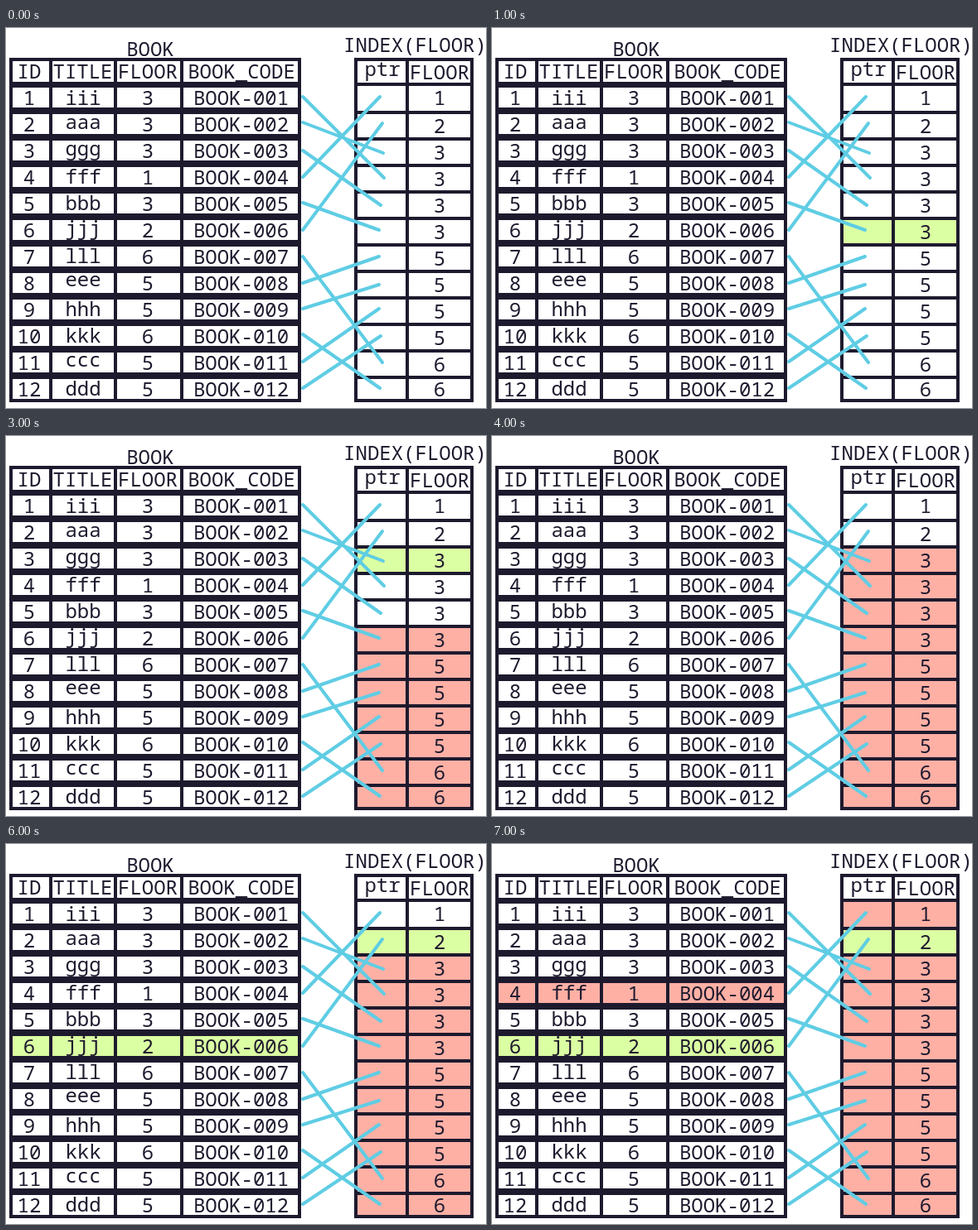
An HTML page with a canvas that plays this animation: 579x459 px, repeating every 8000 ms.

```html
<!DOCTYPE html>
<html lang="en">
<head>
<meta charset="utf-8">
<style>
html, body { margin: 0; width: 100%; height: 100%; overflow: hidden; background: #fff; }
canvas { display: block; }
</style>
</head>
<body>
<canvas id="stage" width="579" height="459"></canvas>
<script>
const ctx = document.getElementById("stage").getContext("2d");
const INK = "#1e1a2e", GREEN = "#dbffa3", RED = "#ffb0a5", LINK = "#5fcde4";
const LOOP = 8000, PITCH = 32, FIRST_ROW = 72;

// title, floor, offset of the title's baseline within the row
const books = [
  ["iii", 3, 21], ["aaa", 3, 18], ["ggg", 3, 18], ["fff", 1, 20],
  ["bbb", 3, 20], ["jjj", 2, 18], ["lll", 6, 20], ["eee", 5, 16],
  ["hhh", 5, 20], ["kkk", 6, 20], ["ccc", 5, 17], ["ddd", 5, 20]
];
const floors = books.map(book => book[1]).sort();

// links from each book row to its index entry: [y1, x2, y2]
const links = [
  [83, 456, 181], [114, 455, 151], [148, 452, 214], [180, 451, 83],
  [211, 450, 244], [244, 454, 115], [276, 454, 404], [308, 450, 276],
  [339, 450, 310], [370, 451, 435], [403, 450, 339], [435, 452, 372]
];

// binary search: [start, table, first row, last row, colour]
const steps = [
  [1000, "index", 6, 6, GREEN],
  [2000, "index", 6, 12, RED],
  [3000, "index", 3, 3, GREEN],
  [4000, "index", 3, 5, RED],
  [5000, "index", 2, 2, GREEN],
  [6000, "book", 6, 6, GREEN],
  [7000, "index", 1, 1, RED],
  [7000, "book", 4, 4, RED]
];

const rowTop = row => FIRST_ROW + (row - 1) * PITCH;

function box(x1, y1, x2, y2, color) {
  ctx.fillStyle = color;
  ctx.fillRect(x1, y1, x2 - x1, y2 - y1);
}

function text(label, x, baseline) {
  ctx.fillStyle = INK;
  ctx.fillText(label, x, baseline);
}

function fillRow(table, row, color) {
  const top = rowTop(row);
  if (table === "book") box(8, top, 352, top + 24, color);
  else box(424, row === 1 ? 70 : top, 560, row === 12 ? 448 : top + 28, color);
}

function drawGrid(table, edges, headerBottom) {
  box(edges[0], 36, edges.at(-1) + 4, 452, INK);
  box(edges[0] + 4, 40, edges.at(-1), headerBottom, "#fff");
  for (let row = 1; row <= 12; row++) fillRow(table, row, "#fff");
}

function drawDividers(edges) {
  edges.forEach(x => box(x, 36, x + 4, 452, INK));
}

function drawText() {
  ctx.font = '24px "Noto Sans Mono", monospace';
  ctx.textAlign = "center";
  text("BOOK", 174, 34);
  text("INDEX(FLOOR)", 493.5, 29);
  text("ID", 28, 61);
  text("TITLE", 92.5, 61);
  text("FLOOR", 171, 61);
  text("BOOK_CODE", 284, 61);
  text("ptr", 454, 58);
  text("FLOOR", 523, 62);
  books.forEach(([title, floor, offset], i) => {
    const top = rowTop(i + 1), baseline = top + 21;
    text(i + 1, 28, baseline);
    text(title, 93, top + offset);
    text(floor, 171, baseline);
    text("BOOK-" + String(i + 1).padStart(3, "0"), 283.5, baseline);
    text(floors[i], 523, baseline + (i === 0 || i === 11 ? 0 : 2));
  });
}

function drawLinks() {
  ctx.strokeStyle = LINK;
  ctx.lineWidth = 4;
  ctx.lineCap = "round";
  ctx.beginPath();
  for (const [y1, x2, y2] of links) {
    ctx.moveTo(358, y1);
    ctx.lineTo(x2, y2);
  }
  ctx.stroke();
}

function draw(time) {
  const bookEdges = [4, 52, 130, 210, 352], indexEdges = [420, 482, 560];
  box(0, 0, 579, 459, "#fff");
  drawGrid("book", bookEdges, 65);
  drawGrid("index", indexEdges, 66);
  for (const [start, table, first, last, color] of steps) {
    if (time < start) continue;
    for (let row = first; row <= last; row++) fillRow(table, row, color);
  }
  drawDividers(bookEdges);
  drawDividers(indexEdges);
  drawText();
  drawLinks();
}

function tick() {
  draw(performance.now() % LOOP);
  requestAnimationFrame(tick);
}
tick();
</script>
</body>
</html>
```
